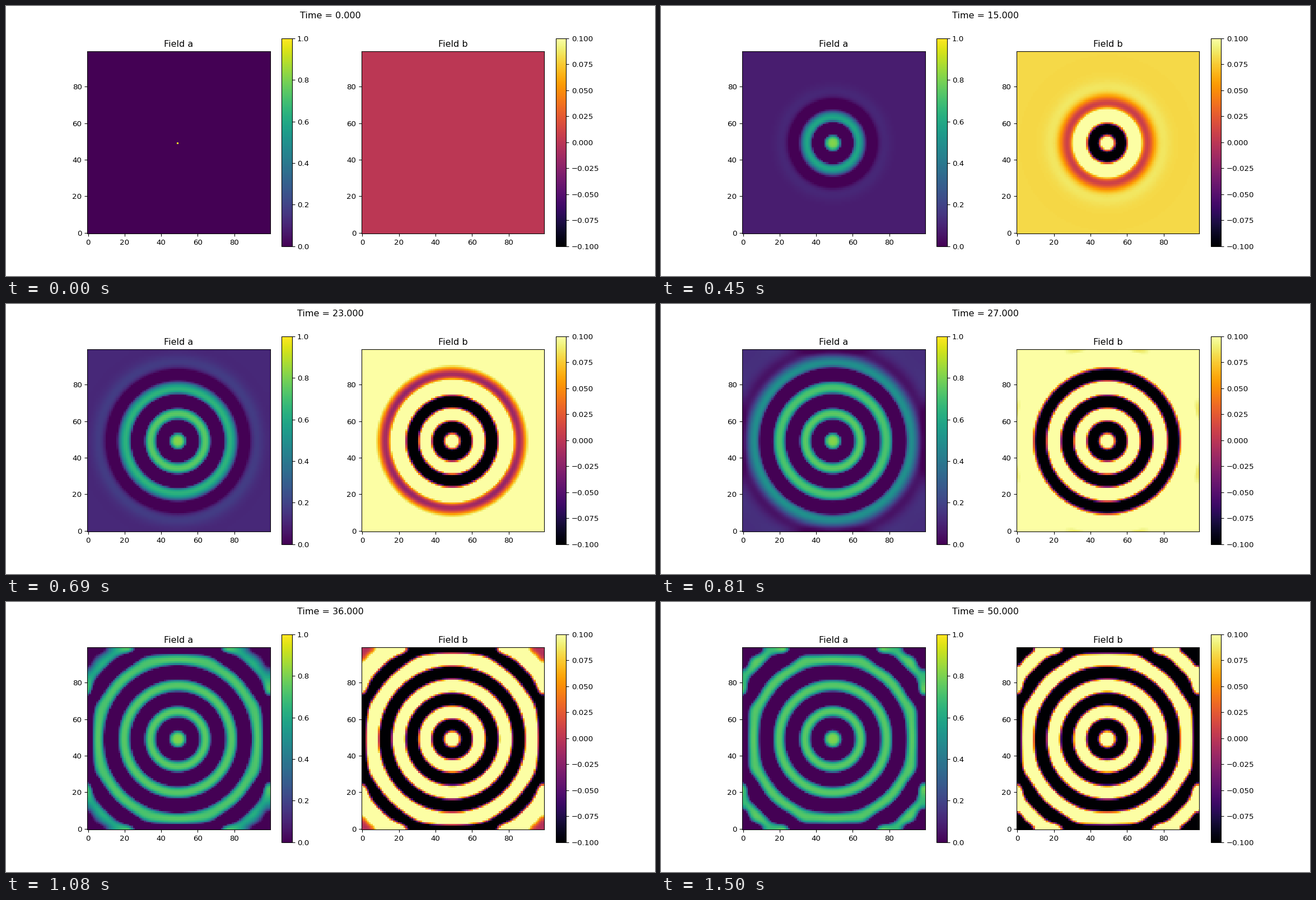
Recreate the animation shown at these times as a matplotlib script. Size 1159 by 483 pixels, loop 1530 ms.

```python
import numpy as np
import matplotlib.pyplot as plt
from matplotlib.animation import FuncAnimation

WIDTH, HEIGHT, DPI = 1159, 483, 96
SIZE = 100
FRAMES = 51          # one time unit per frame
STEPS = 50           # integration steps per time unit
H = 1 / STEPS
DA, DB = 1.0, 100.0  # diffusion rates
ALPHA, BETA = 0.005, 10.0


def linear_propagator():
    """Exact exponential of the linear part, per Fourier mode, on a periodic grid."""
    cx = np.cos(2 * np.pi * np.fft.rfftfreq(SIZE))
    cy = np.cos(2 * np.pi * np.fft.fftfreq(SIZE))
    k = 4 - 2 * cx[None, :] - 2 * cy[:, None]
    m_aa, m_bb = 1 - DA * k, -BETA - DB * k
    mean, half = (m_aa + m_bb) / 2, (m_aa - m_bb) / 2
    q = np.sqrt(half ** 2 - BETA)
    grow, decay = np.exp((mean + q) * H), np.exp((mean - q) * H)
    c, s = (grow + decay) / 2, (grow - decay) / (2 * q)
    return c + s * half, -s, BETA * s, c - s * half


def react(a, h):
    """Cubic damping and constant feed over a time h."""
    return a / np.sqrt(1 + 2 * h * a * a) + ALPHA * h


def simulate():
    """Reaction-diffusion from a single seeded cell, one state per frame."""
    e_aa, e_ab, e_ba, e_bb = linear_propagator()
    a, b = np.zeros((2, SIZE, SIZE))
    centre = SIZE // 2 - 1
    a[centre, centre] = 1
    states = [(a, b)]
    for _ in range(FRAMES - 1):
        for _ in range(STEPS):
            fa, fb = np.fft.rfft2(react(a, H / 2)), np.fft.rfft2(b)
            a = react(np.fft.irfft2(e_aa * fa + e_ab * fb, s=a.shape), H / 2)
            b = np.fft.irfft2(e_ba * fa + e_bb * fb, s=b.shape)
        states.append((a, b))
    return states


def add_panel(ax, field, title, cmap, vmin, vmax):
    im = ax.imshow(field, cmap=cmap, vmin=vmin, vmax=vmax, origin="lower")
    ax.set_title(title)
    fig.colorbar(im, ax=ax)
    return im


states = simulate()
fig, (ax_a, ax_b) = plt.subplots(1, 2, figsize=(WIDTH / DPI, HEIGHT / DPI), dpi=DPI)
im_a = add_panel(ax_a, states[0][0], "Field a", "viridis", 0, 1)
im_b = add_panel(ax_b, states[0][1], "Field b", "inferno", -0.1, 0.1)
clock = fig.suptitle("Time = 0.000")


def update(i):
    a, b = states[i]
    im_a.set_data(a)
    im_b.set_data(b)
    clock.set_text(f"Time = {i:.3f}")
    return im_a, im_b, clock


anim = FuncAnimation(fig, update, frames=FRAMES, interval=30,
                     repeat=True, repeat_delay=0)
plt.show()
```
